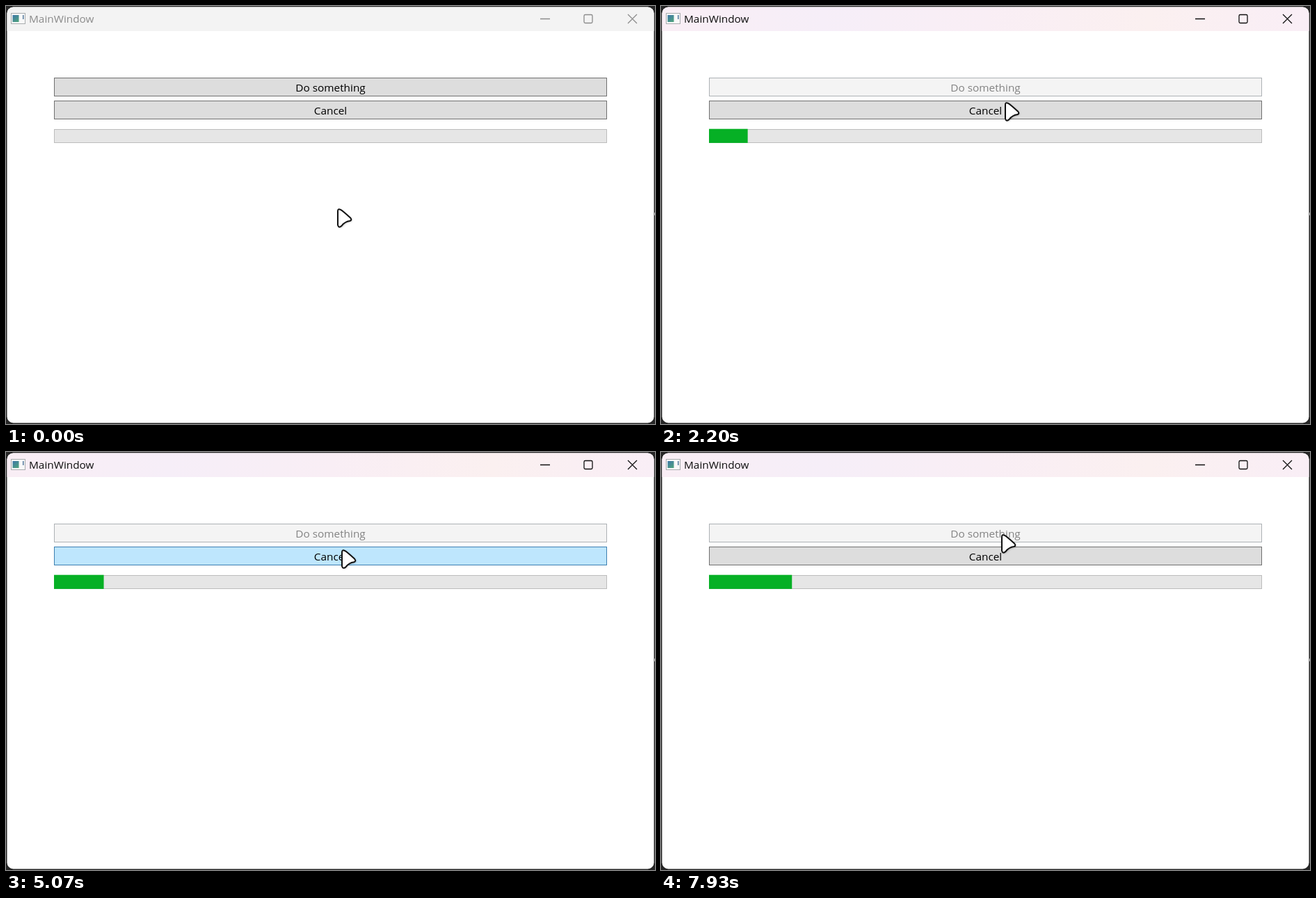
An HTML page with a canvas for the animation above (8 s loop, 933 px wide and 601 px high).

```html
<!DOCTYPE html>
<html lang="en">
<head>
<meta charset="utf-8">
<title>MainWindow</title>
<style>
html, body { margin: 0; width: 100%; height: 100%; overflow: hidden; background: #262626; }
canvas { display: block; }
</style>
</head>
<body>
<canvas id="stage" width="933" height="601"></canvas>
<script>
const ctx = document.getElementById('stage').getContext('2d');
const LOOP = 8000;
const FONT = '15.35px "Open Sans", "Noto Sans", sans-serif';
const LEFT = 69, WIDTH = 795, BUTTON_H = 27;
const DO_Y = 103, CANCEL_Y = 136;

// Time is counted in ticks of 1/15 s.
const TICKS_PER_PERCENT = 1.641;
const LOCK_LEAD = 1.45;  // button locks this long before the bar restarts
const PRESS_TIME = 1.5;
const runs = [
  { start: 21.45, stop: 43 },
  { start: 60.95, stop: 81 },
  { start: 93.41, stop: Infinity }
];

const home = { x: 476, y: 291 };
const moves = [
  { from: 7, to: 17.1, x: 498, y: 113 },
  { from: 31, to: 33, x: 494, y: 138 },
  { from: 34, to: 38, x: 487, y: 147 },
  { from: 53, to: 56, x: 481, y: 113 },
  { from: 73, to: 75, x: 482, y: 139 },
  { from: 75, to: 78, x: 482, y: 147 },
  { from: 85, to: 88, x: 489, y: 118 }
];

const styles = {
  normal: ['#dddddd', '#707070', '#000'],
  hover: ['#bee6fd', '#3c7fb1', '#000'],
  pressed: ['#c4e5f6', '#2c628b', '#000'],
  disabled: ['#f4f4f4', '#adb2b5', '#838383']
};

const ease = t => t < 0.5 ? 4 * t ** 3 : 1 - 4 * (1 - t) ** 3;

function pointerAt(n) {
  let { x, y } = home;
  for (const m of moves) {
    const k = ease(Math.min(1, Math.max(0, (n - m.from) / (m.to - m.from))));
    x += (m.x - x) * k;
    y += (m.y - y) * k;
  }
  return { x, y };
}

function percentAt(n) {
  const run = runs.filter(r => r.start <= n).pop();
  return run ? Math.floor((Math.min(n, run.stop) - run.start) / TICKS_PER_PERCENT) : 0;
}

function text(str, x, y, color, align) {
  ctx.font = FONT;
  ctx.textAlign = align;
  ctx.fillStyle = color;
  ctx.fillText(str, x, y);
}

function box(x, y, w, h, fill, stroke) {
  ctx.fillStyle = fill;
  ctx.fillRect(x, y, w, h);
  ctx.strokeStyle = stroke;
  ctx.lineWidth = 1;
  ctx.strokeRect(x + 0.5, y + 0.5, w - 1, h - 1);
}

function button(label, y, state) {
  const [fill, stroke, color] = styles[state];
  box(LEFT, y, WIDTH, BUTTON_H, fill, stroke);
  text(label, LEFT + WIDTH / 2, y + 19.5, color, 'center');
}

function gradient(x0, y0, x1, y1, colors) {
  const g = ctx.createLinearGradient(x0, y0, x1, y1);
  colors.forEach((c, i) => g.addColorStop(i / (colors.length - 1), c));
  return g;
}

function titleBar(active) {
  ctx.fillStyle = active
    ? gradient(2, 0, 931, 0, ['#f9eef5', '#f6eef8', '#f9eef5', '#fbf0f0', '#f9eef6'])
    : '#f3f3f3';
  ctx.fillRect(0, 0, 933, 36);

  box(7, 10, 21, 16, '#f8f8f8', '#a8acae');
  ctx.fillStyle = gradient(10, 13, 18, 23, ['#3f78a8', '#4fa47c']);
  ctx.fillRect(9.5, 13, 9, 10);
  ctx.fillStyle = '#53789c';
  ctx.fillRect(24, 13, 1.5, 6);

  const ink = active ? '#101010' : '#8c8c8c';
  text('MainWindow', 33, 24, ink, 'left');
  ctx.strokeStyle = ink;
  ctx.lineWidth = 1.3;
  ctx.beginPath();
  ctx.moveTo(768, 18.5);
  ctx.lineTo(782, 18.5);
  ctx.moveTo(894, 12);
  ctx.lineTo(907, 25);
  ctx.moveTo(907, 12);
  ctx.lineTo(894, 25);
  ctx.roundRect(831, 12.5, 12, 12, 1.8);
  ctx.stroke();
}

function pointer({ x, y }) {
  ctx.save();
  ctx.translate(x, y);
  ctx.beginPath();
  ctx.moveTo(1, 4);
  ctx.quadraticCurveTo(1, -0.2, 5, 1.8);
  ctx.quadraticCurveTo(8, 3.4, 19, 13.4);
  ctx.quadraticCurveTo(22, 16.8, 18.4, 18);
  ctx.quadraticCurveTo(11, 19, 6.6, 25);
  ctx.quadraticCurveTo(2.4, 28.8, 1, 24);
  ctx.closePath();
  ctx.shadowColor = 'rgba(0,0,0,0.3)';
  ctx.shadowBlur = 3;
  ctx.shadowOffsetX = ctx.shadowOffsetY = 1;
  ctx.fillStyle = '#fff';
  ctx.fill();
  ctx.shadowColor = 'transparent';
  ctx.strokeStyle = '#111';
  ctx.lineWidth = 2;
  ctx.lineJoin = 'round';
  ctx.stroke();
  ctx.restore();
}

function windowFrame(active) {
  ctx.fillStyle = '#262626';
  ctx.fillRect(0, 0, 933, 601);
  ctx.save();
  ctx.beginPath();
  ctx.roundRect(1.5, 1.5, 930, 598, 9);
  ctx.clip();
  ctx.fillStyle = '#fff';
  ctx.fillRect(0, 0, 933, 601);
  titleBar(active);
  ctx.restore();
  ctx.fillStyle = '#b0b0b0';
  ctx.fillRect(932, 297, 1, 4);
}

function draw(n) {
  const hoverY = pointerAt(n - 1).y; // hover trails the pointer by one tick
  const heldUntil = end => n < end && n >= end - PRESS_TIME;
  const lockAt = r => r.start - LOCK_LEAD;
  const state = (y, pressed) => pressed ? 'pressed'
    : hoverY >= y && hoverY < y + BUTTON_H ? 'hover' : 'normal';
  const locked = runs.some(r => n >= lockAt(r) && n < r.stop);

  windowFrame(n >= lockAt(runs[0]) - PRESS_TIME);
  button('Do something', DO_Y, locked ? 'disabled'
    : state(DO_Y, runs.some(r => heldUntil(lockAt(r)))));
  button('Cancel', CANCEL_Y, state(CANCEL_Y, runs.some(r => heldUntil(r.stop))));
  box(LEFT, 177, WIDTH, 20, '#e6e6e6', '#bcbcbc');
  ctx.fillStyle = '#06b025';
  ctx.fillRect(LEFT, 176.7, WIDTH * percentAt(n) / 100, 20.2);
  pointer(pointerAt(n));
}

const begin = performance.now();
function loop() {
  const t = (performance.now() - begin) % LOOP;
  // ticks fall on whole hundredths of a second
  draw(Math.floor((Math.floor(t / 10) + 0.5) * 0.15));
  requestAnimationFrame(loop);
}
loop();
</script>
</body>
</html>
```
